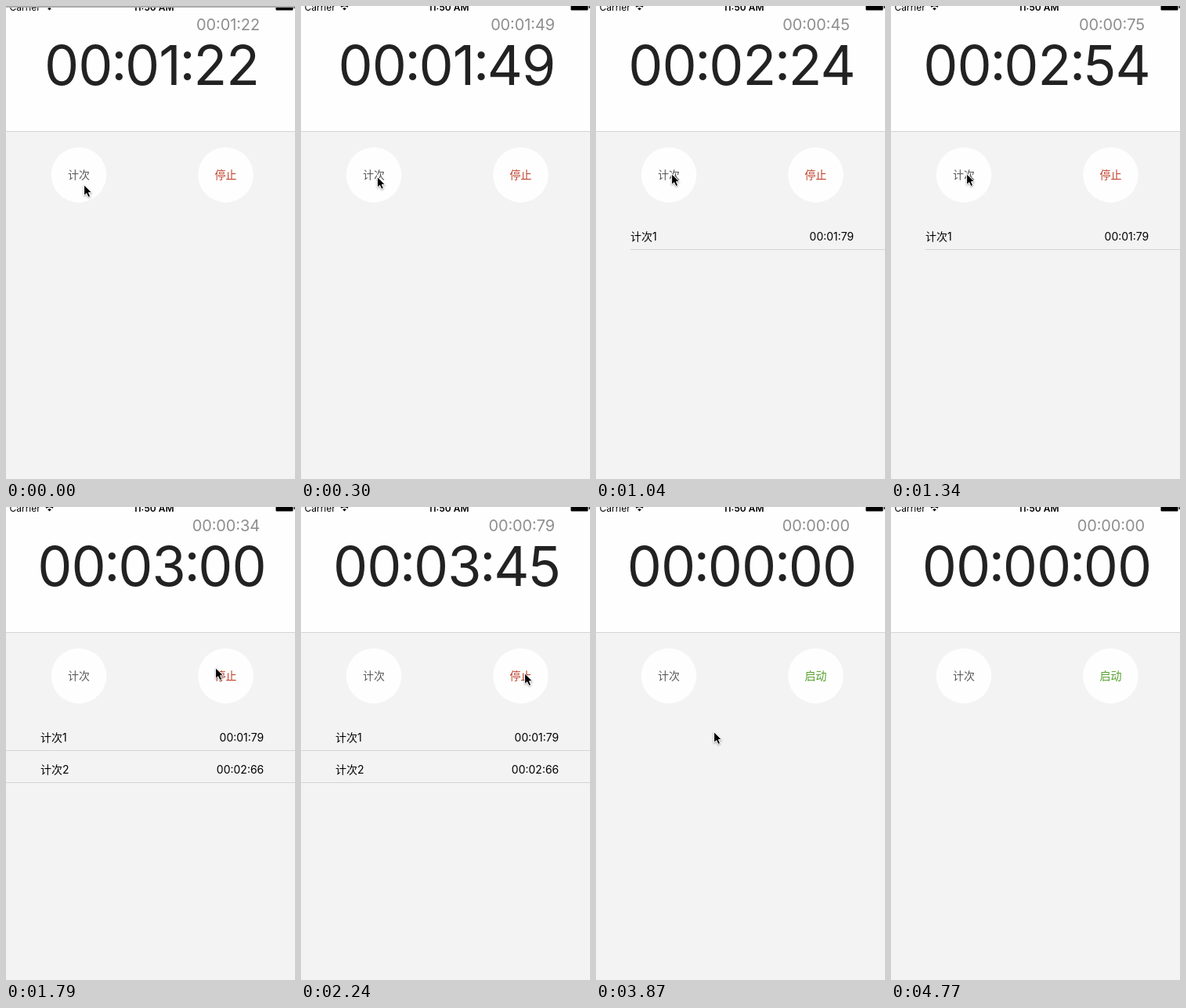
Animation of 369x605 px, one loop 6.11 s. Source, as an HTML page:

```html
<!DOCTYPE html>
<html lang="zh-CN">
<head>
<meta charset="utf-8">
<title>Stopwatch</title>
<style>
  html, body { margin: 0; height: 100%; overflow: hidden; background: #f3f3f3; }
  svg { display: block; font: 14px Inter, "Noto Sans CJK SC", "Noto Sans CJK", sans-serif; }
  .mid { text-anchor: middle; }
  .end { text-anchor: end; }
  .status { font-size: 12px; }
  #total { font-size: 70px; letter-spacing: -.95px; font-feature-settings: "calt" 0; fill: #222; }
  #lap { font-size: 20px; letter-spacing: -.12px; font-feature-settings: "calt"; fill: #8e8e8e; }
  .rule { fill: #d4d4d4; }
  #cursor { filter: drop-shadow(.5px 1.5px 1px rgba(0, 0, 0, .35)); }
</style>
</head>
<body>
<svg width="369" height="605" viewBox="0 0 369 605">
  <rect width="369" height="605" fill="#f3f3f3"/>
  <rect width="369" height="160" fill="#fefefe"/>
  <rect class="rule" y="160" width="369" height="1"/>

  <g class="status">
    <text x="4.5" y="5.5">Carrier</text>
    <path d="M53.2 3.2Q55.5 1.4 57.8 3.2L55.5 5.6Z"/>
    <path d="M51 1.2Q55.5 -2.4 60 1.2" fill="none" stroke="#000" stroke-width="1.5"/>
    <text class="mid" x="188.5" y="5.5" font-weight="600">11:50 AM</text>
    <rect x="344.5" y="-3" width="22" height="8.5" rx="1"/>
    <rect x="367.5" width="1.5" height="3" fill="#333"/>
  </g>
  <rect id="edge" width="369" height="2" fill="#aaa"/>

  <text id="lap" class="end" x="324" y="30.7"></text>
  <text id="total" class="mid" x="186" y="100.7"></text>

  <circle cx="93" cy="216" r="35.3" fill="#fefefe"/>
  <circle cx="280.5" cy="216" r="35.3" fill="#fefefe"/>
  <text id="left" class="mid" x="93" y="221.3" fill="#5a5a5a"></text>
  <text id="right" class="mid" x="280.5" y="221.3"></text>

  <g id="row1">
    <text x="44" y="299.8">计次1</text>
    <text class="end" x="329.3" y="299.8">00:01:79</text>
    <rect id="rule1" class="rule" y="311" width="369" height="1"/>
  </g>
  <g id="row2">
    <text x="44" y="340.8">计次2</text>
    <text class="end" x="329.3" y="340.8">00:02:66</text>
    <rect class="rule" y="352" width="369" height="1"/>
  </g>

  <path id="cursor" d="M.6 .8V14.6L3.8 11.7L6 16.6L8.6 15.5L6.5 10.7H10.6Z" stroke="#fff" stroke-width="1"/>
</svg>
<script>
const LOOP = 6110, STEP = 149.1;
const LAP1 = 1040, LAP2 = 1480, STOP = 2530, RESET = 3270;

// Where the pointer goes: start and end time, then the place it reaches.
const moves = [
  { from: 0, to: 450, x: 96, y: 214 },
  { from: LAP2, to: 1785, x: 267, y: 205 },
  { from: 1785, to: 2090, x: 285, y: 212 },
  { from: STOP, to: 2975, x: 102, y: 209 },
  { from: 2975, to: 3125, x: 96, y: 211 },
  { from: 3580, to: 4010, x: 303, y: 502 },
  { from: 4310, to: 4765, x: 334, y: 610 },
];

const $ = id => document.getElementById(id);
const show = (id, on) => $(id).setAttribute("visibility", on ? "visible" : "hidden");
const clamp = (v, low, high) => Math.min(high, Math.max(low, v));
const pad = n => String(n).padStart(2, "0");
const format = cs => `00:${pad(Math.floor(cs / 100))}:${pad(cs % 100)}`;

// Colons sit tighter and are centred on the digit height.
const raiseColons = text => text.replace(/:(\d+)/g,
  '<tspan dx="-1.3" dy="-6.2">:</tspan><tspan dx="-1.3" dy="6.2">$1</tspan>');

// The screen refreshes in steps and stalls while the first lap is saved.
const refresh = t => t < LAP1
  ? Math.min(600, Math.floor(t / 150) * 150)
  : LAP1 + Math.floor((t - LAP1) / STEP) * STEP;

function pointer(t) {
  let x = 99, y = 228;
  for (const move of moves) {
    const u = clamp((t - move.from) / (move.to - move.from), 0, 1);
    const eased = u * u * (3 - 2 * u);
    x += (move.x - x) * eased;
    y += (move.y - y) * eased;
  }
  return `translate(${x} ${y})`;
}

function draw(time) {
  const t = refresh(time);
  const reset = t >= RESET;
  const running = t < STOP;
  const hasRow1 = t >= LAP1 && !reset;
  const hasRow2 = t >= LAP2 && !reset;
  const total = reset ? 0 : Math.round(clamp(118 + t * .1017, 122, 373));

  $("total").innerHTML = raiseColons(format(total));
  $("lap").textContent = format(total - (hasRow2 ? 266 : hasRow1 ? 179 : 0));
  $("left").textContent = running || reset ? "计次" : "复位";
  $("right").textContent = running ? "停止" : "启动";
  $("right").setAttribute("fill", running ? "#bf3f28" : "#55a02c");

  show("edge", t < 150);
  show("row1", hasRow1);
  show("row2", hasRow2);
  $("rule1").setAttribute("x", hasRow2 ? 0 : 44);
  $("cursor").setAttribute("transform", pointer(t));
}

const start = performance.now();
function frame() {
  draw((performance.now() - start) % LOOP);
  requestAnimationFrame(frame);
}
frame();
</script>
</body>
</html>
```
